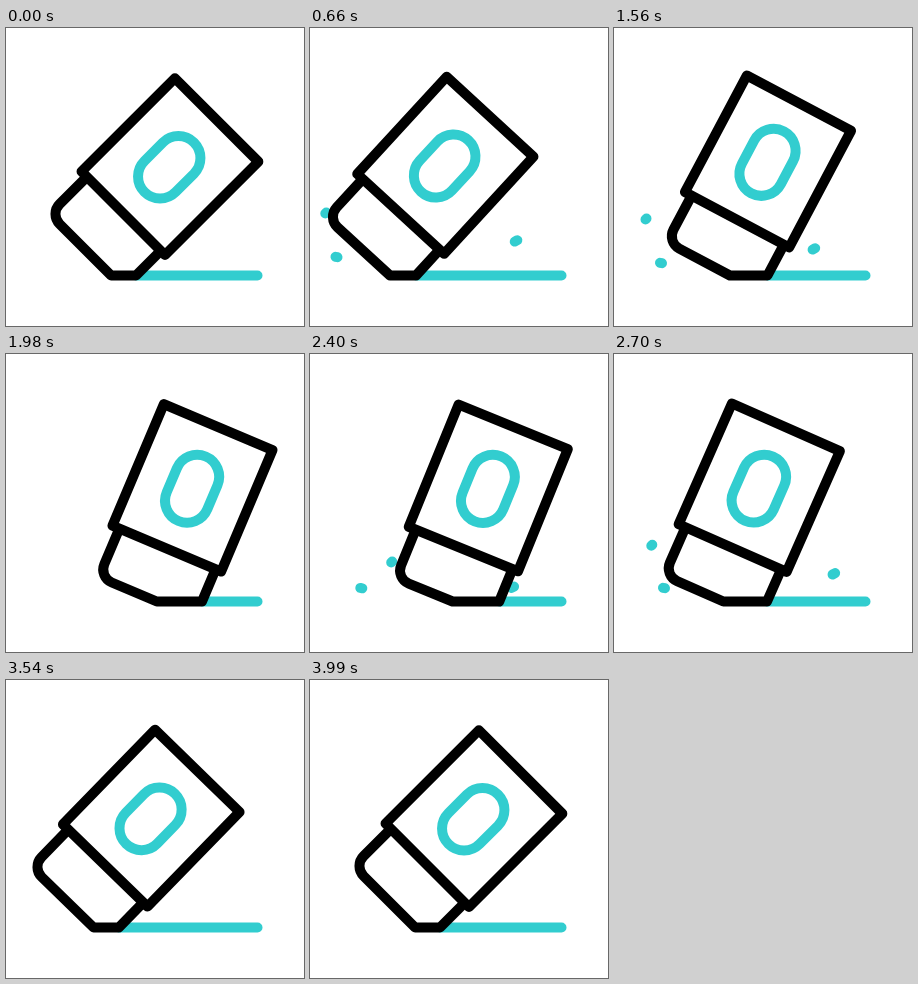
An HTML page for the animation above (5400 ms loop, 298 by 298 pixels).

```html
<!DOCTYPE html>
<html lang="en">
<head>
<meta charset="utf-8">
<title>Eraser</title>
<style>
  html, body { margin: 0; width: 100%; height: 100%; overflow: hidden; background: #fff; }
  svg { display: block; width: 100%; height: 100%; }
  .ink { stroke: #000; fill: #fff; }
  .accent { stroke: #32cdcf; fill: none; }
</style>
</head>
<body>
<svg viewBox="0 0 298 298" stroke-width="10" stroke-linecap="round" stroke-linejoin="round">
  <g id="crumbs" class="accent"></g>
  <path id="ground" class="accent"/>
  <g id="eraser">
    <path id="tip" class="ink"/>
    <rect class="ink" width="118" height="132"/>
    <rect class="accent" x="37" y="32" width="44" height="70" rx="22"/>
  </g>
</svg>
<script>
const LOOP = 5400, STEP = 30, GROUND = 247.5;
const PIVOT = { u: 112, v: 167 }, TIP_END = 184.6;
const $ = id => document.getElementById(id);

// [time, value] keys
const slide = [[0, 130], [570, 111], [660, 106], [870, 100], [1140, 111], [1710, 170],
  [1980, 196], [2100, 200], [2280, 197], [2700, 153], [3180, 96], [3420, 107], [3990, 130]];
const tilt = [[0, 45], [660, 42.6], [1140, 35.4], [1710, 25.7], [1980, 22.9], [2280, 22],
  [2700, 23.8], [3180, 38.9], [3420, 43], [3600, 44.5], [3990, 45]];

// Slope at a key: zero at ends and turning points
function slope(keys, i) {
  if (i === 0 || i === keys.length - 1) return 0;
  const [a, b, c] = keys.slice(i - 1, i + 2);
  const left = (b[1] - a[1]) / (b[0] - a[0]);
  const right = (c[1] - b[1]) / (c[0] - b[0]);
  return left * right <= 0 ? 0 : 2 * left * right / (left + right);
}

function sample(keys, t) {
  const last = keys.length - 1;
  if (t >= keys[last][0]) return keys[last][1];
  let i = 0;
  while (t >= keys[i + 1][0]) i++;
  const [t0, v0] = keys[i], [t1, v1] = keys[i + 1];
  const h = t1 - t0, x = (t - t0) / h, s = x * x * (3 - 2 * x);
  return v0 + (v1 - v0) * s
    + h * x * (1 - x) * ((1 - x) * slope(keys, i) - x * slope(keys, i + 1));
}

// Each burst throws three crumbs from under the tip
const FLIGHT = 750, SHRINK = 100;
const POWERS = [3, 12, 1.5];
const LEAN = [[0.5, -0.5], [1, 0.2], [1.3, -0.7]];
const bursts = [
  { start: 60, ends: [[15, 184.5], [26.5, 229], [215, 209.5]] },
  { start: 1050, ends: [[30, 189], [47, 235], [224, 215]] },
  { start: 2160, ends: [[34.5, 190], [50, 234], [226, 215]] }
];

const crumbs = POWERS.map(() => {
  const p = document.createElementNS("http://www.w3.org/2000/svg", "path");
  $("crumbs").appendChild(p);
  return p;
});

function drawCrumbs(t) {
  const burst = bursts.find(b => t >= b.start && t < b.start + FLIGHT + SHRINK);
  $("crumbs").style.display = burst ? "" : "none";
  if (!burst) return;
  const age = t - burst.start, x = Math.min(1, age / FLIGHT);
  const size = 10 * Math.min(1, 1 - (age - FLIGHT) / SHRINK);
  const from = sample(slide, burst.start) - 15;
  crumbs.forEach((p, i) => {
    const k = 1 - (1 - x) ** POWERS[i];
    const [ex, ey] = burst.ends[i], [lx, ly] = LEAN[i];
    const cx = from + (ex - from) * k, cy = GROUND + (ey - GROUND) * k;
    p.setAttribute("d", `M${cx - lx} ${cy - ly}L${cx + lx} ${cy + ly}`);
    p.setAttribute("stroke-width", size);
  });
}

function draw(t) {
  const x = sample(slide, t), deg = sample(tilt, t), a = deg * Math.PI / 180;
  // The worn corner always lies flat on the ground
  const flat = PIVOT.u - (TIP_END - PIVOT.v) / Math.tan(a);
  $("tip").setAttribute("d",
    `M7.5 132V170.6A14 14 0 0 0 21.5 ${TIP_END}H${flat}L${PIVOT.u} ${PIVOT.v}V132`);
  $("eraser").setAttribute("transform",
    `translate(${x} ${GROUND}) rotate(${deg}) translate(${-PIVOT.u} ${-PIVOT.v})`);
  $("ground").setAttribute("d", `M${x} ${GROUND}H251.5`);
  drawCrumbs(t);
}

function tick() {
  const t = performance.now() % LOOP;
  draw(Math.floor(t / STEP) * STEP);
  requestAnimationFrame(tick);
}
tick();
</script>
</body>
</html>
```
